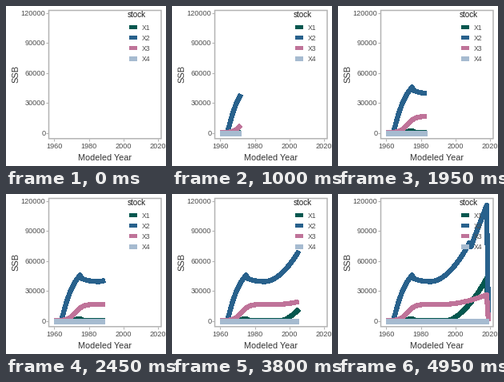
Animation, 200 px wide and 200 px high, one loop 5 s. Source, as a matplotlib script:

```python
import numpy as np
import matplotlib.pyplot as plt
from matplotlib.animation import FuncAnimation
from matplotlib.patches import Rectangle

SIZE, DPI = 200, 100
FRAMES, INTERVAL = 100, 50
FIRST, LAST = 1960, 2019
PT = 72 / DPI  # points per pixel
GREY, TEXT, TITLE = "#b3b3b3", "#4d4d4d", "#333333"
YEARS = np.arange(FIRST, LAST + 1)

plt.rcParams["font.family"] = "Liberation Sans"


def since(start):
    return np.maximum(YEARS - start, 0)


def growth(start, gain, power):
    """Late growth that reaches the gain one year before the end."""
    return gain * (since(start) / (LAST - 1 - start)) ** power


def small_bump():
    return 2.3 * np.exp(-((YEARS - 1974.3) / 2) ** 2) + growth(1994, 42.5, 1.75)


def rise_and_climb():
    rise = 60.5 * (1 - np.exp(-since(1964.3) / 7.6))
    settle = 38.8 + 3.5 * np.exp(-since(1976) / 4)
    setback = np.where(YEARS >= 2009, 7 * np.exp(-since(2009) / 4), 0)
    climb = settle + growth(1985, 77.5, 1.9) - setback
    return np.where(YEARS <= 1975, rise, climb)


def plateau():
    return 16.5 / (1 + np.exp((1972.3 - YEARS) / 2.2)) + growth(1994, 9.5, 1.7)


# Biomass in thousands; every stock collapses in the last year
STOCKS = {
    "X1": ("#04574f", small_bump()),
    "X2": ("#28618c", rise_and_climb()),
    "X3": ("#bf7399", plateau()),
    "X4": ("#a6bbd0", 0 * YEARS),
}
for _, biomass in STOCKS.values():
    biomass[-1] = 0


def px(year):
    return 60.2 + (np.asarray(year) - FIRST) * 130 / 60


def py(thousands):
    return 158.5 - np.asarray(thousands) * 1.25


def label(x, y, text, size, color=TEXT, **kw):
    kw = {"ha": "center", "va": "baseline", **kw}
    ax.text(x, y, text, fontsize=size * PT, color=color, zorder=5, **kw)


def tick(xs, ys):
    ax.plot(xs, ys, color=GREY, lw=1.07 * PT, solid_capstyle="butt", zorder=1)


fig = plt.figure(figsize=(SIZE / DPI, SIZE / DPI), dpi=DPI, facecolor="white")
ax = fig.add_axes([0, 0, 1, 1])
ax.set_xlim(0, SIZE)
ax.set_ylim(SIZE, 0)
ax.axis("off")

ax.add_patch(Rectangle((53.5, 5.5), 140.5, 160.3, fill=False, ec=GREY,
                       lw=1.5 * PT, snap=False, zorder=1))

for value in range(0, 121, 30):
    y = py(value)
    tick([50, 53], [y, y])
    label(49.4, y + 3.4, str(value * 1000), 9.2, ha="right")
for year in range(1960, 2021, 20):
    x = px(year)
    tick([x, x], [166, 169])
    label(x, 178.5, str(year), 9.2)

label(123, 192.8, "Modeled Year", 10.9, TITLE)
label(12, 84.5, "SSB", 11, TITLE, rotation=90, va="center")
label(152, 14, "stock", 9.9, "#1a1a1a", ha="left")

lines = {}
for i, (name, (color, _)) in enumerate(STOCKS.items()):
    y = 26.8 + 13 * i
    ax.add_patch(Rectangle((154, y - 2.7), 10, 5.4, fc=color, lw=0, zorder=4))
    label(169.7, y + 3.4, name, 8.7, ha="left")
    lines[name], = ax.plot([], [], color=color, lw=5.2 * PT, zorder=2 + i / 10,
                           antialiased=False, solid_capstyle="butt",
                           solid_joinstyle="round")


def draw(frame):
    now = FIRST + (LAST - FIRST) * frame / (FRAMES - 1)
    shown = np.append(YEARS[YEARS < now], now)
    for name, (_, biomass) in STOCKS.items():
        lines[name].set_data(px(shown), py(np.interp(shown, YEARS, biomass)))
        lines[name].set_visible(frame > 0)
    return list(lines.values())


anim = FuncAnimation(fig, draw, frames=FRAMES, interval=INTERVAL,
                     repeat=True, repeat_delay=0)
plt.show()
```
